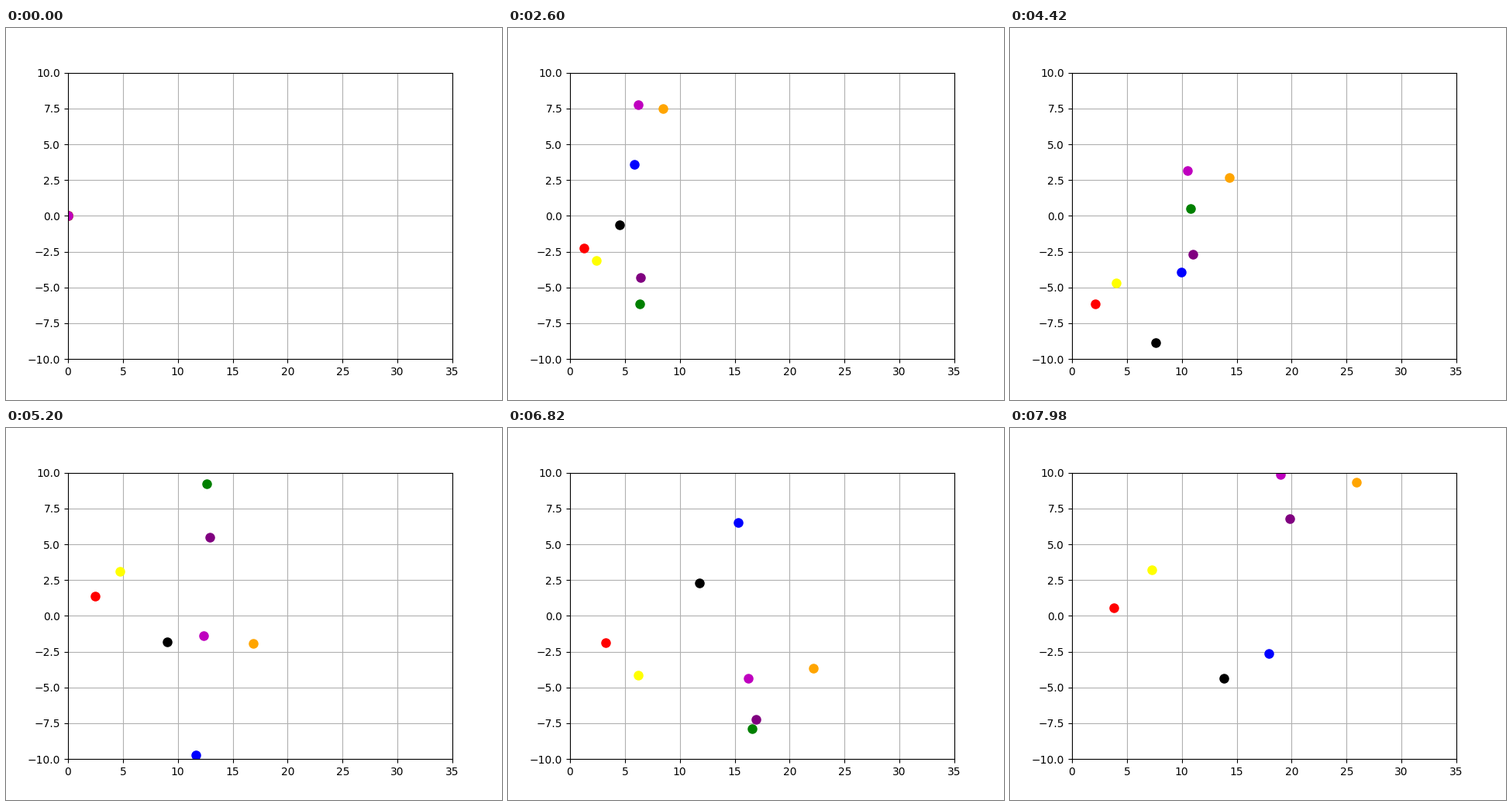
A matplotlib script that plays this animation: 640x480 px, repeating every 8000 ms.

```python
import numpy as np
import matplotlib.pyplot as plt
from matplotlib.animation import FuncAnimation

FRAMES, INTERVAL = 400, 20
DT = 0.01
G = 10.0
WALL = 10.0
MAX_BOUNCES = 3

# colour, horizontal speed, vertical speed
BALLS = [
    ("red", 0.955, 4.77),
    ("blue", 4.49, 9.27),
    ("green", 4.87, 1.77),
    ("black", 3.464, 6.00),
    ("yellow", 1.823, 4.11),
    ("purple", 4.966, 3.205),
    ("orange", 6.488, 12.26),
    ("m", 4.757, 12.47),
]


def height(vy, t):
    """Free fall mirrored at the floor and ceiling, for a few bounces only."""
    y = vy * t - G * t * t / 2
    wall = -WALL
    for _ in range(MAX_BOUNCES):
        if abs(y) <= WALL or y * wall < 0:
            break
        y = 2 * wall - y
        wall = -wall
    return y


fig, ax = plt.subplots(figsize=(6.4, 4.8), dpi=100)
ax.set_xlim(0, 35)
ax.set_ylim(-WALL, WALL)
ax.grid(True)
dots = [ax.plot([0], [0], "o", color=c, markersize=8)[0] for c, _, _ in BALLS]


def update(i):
    t = i * DT
    for dot, (_, vx, vy) in zip(dots, BALLS):
        dot.set_data([vx * t], [height(vy, t)])
    return dots


anim = FuncAnimation(fig, update, frames=FRAMES, interval=INTERVAL,
                     repeat=True, repeat_delay=0, blit=False)
plt.show()
```
